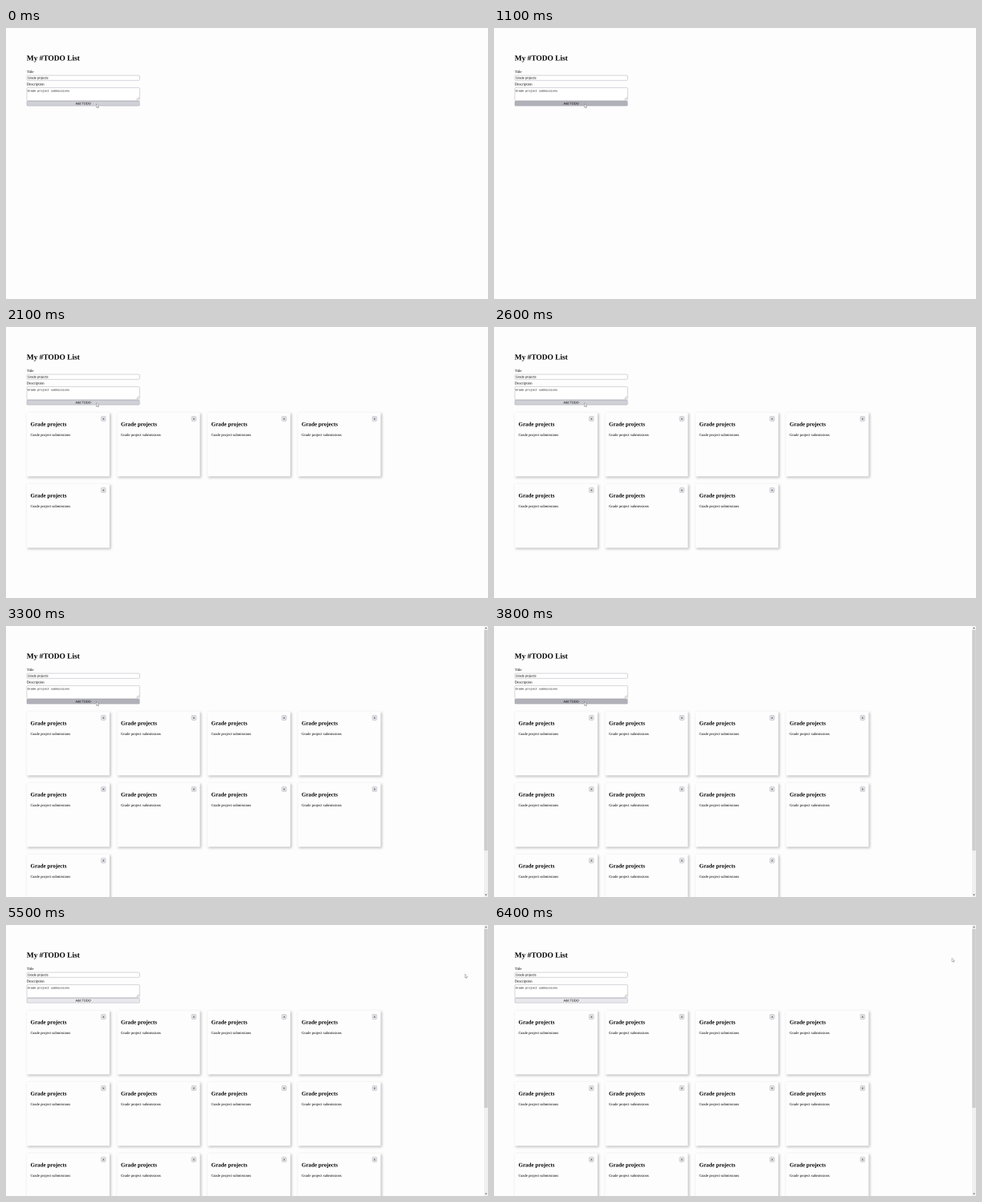
These frames come from a looping animation (600x338 px, 6600 ms). An HTML page with a canvas:

```html
<!DOCTYPE html>
<html lang="en">
<head>
<meta charset="utf-8">
<title>My #TODO List</title>
<style>
  html, body { margin: 0; width: 100%; height: 100%; overflow: hidden; background: #fdfdfd; }
  canvas { display: block; width: 600px; height: 338px; }
</style>
</head>
<body>
<canvas id="stage"></canvas>
<script>
const canvas = document.getElementById('stage');
const ctx = canvas.getContext('2d');
const W = 600, H = 338, LOOP = 6600, FRAME = 100;
const PAGE = W / 2048;                            // the page is laid out 2048 px wide
const RES = 2 * (window.devicePixelRatio || 1);   // oversampled for soft small text
canvas.width = W * RES;
canvas.height = H * RES;

const SERIF = '"Liberation Serif", "Times New Roman", serif';
const SANS = '"Liberation Sans", Arial, sans-serif';
const MONO = '"Liberation Mono", monospace';
const BG = '#fdfdfd', BORDER = '#8f8f9d';
const LEFT = 88, FORM_W = 480;
const CARD = { w: 352, h: 272, top: 364, gap: 32, cols: 4 };
const CLICKS = 13, HOLD = 100, LEAVE = 4800;

// Steady clicking, a little ahead of the beat halfway through
const clickTime = n => 1124 + 249 * n - 73 * Math.sin(Math.PI * n / (CLICKS - 1)) ** 2;

function clicksBy(t) {
  let n = 0;
  while (n < CLICKS && clickTime(n) <= t) n++;
  return n;
}

// Pointer legs: a wide sweep, a hook at the right edge, a slow drift
const rest = [112.4, 94.7];
const legs = [
  { from: LEAVE, to: 5400, path: [[145.8, 102.3], [355, 284], [563.4, 70]] },
  { from: 5400, to: 5900, path: [[563.4, 70], [587, 46], [569.6, 43]] },
  { from: 5900, to: 6400, path: [[569.6, 43], [569.2, 42.2], [570, 41.2]] }
];

function pointerAt(t) {
  const leg = legs.filter(l => t >= l.from).pop();
  if (!leg) return rest;
  const u = Math.min(1, (t - leg.from) / (leg.to - leg.from)), v = 1 - u;
  const [a, b, c] = leg.path;
  return [0, 1].map(i => v * v * a[i] + 2 * u * v * b[i] + u * u * c[i]);
}

function text(str, x, y, font, align = 'left') {
  ctx.font = font;
  ctx.textAlign = align;
  ctx.fillStyle = '#000';
  ctx.fillText(str, x, y);
}

function box(x, y, w, h, fill, radius = 3) {
  ctx.beginPath();
  ctx.roundRect(x + .6, y + .6, w - 1.2, h - 1.2, radius);
  ctx.fillStyle = fill;
  ctx.fill();
  ctx.strokeStyle = BORDER;
  ctx.lineWidth = 1.2;
  ctx.stroke();
}

function shape(points, fill) {
  ctx.beginPath();
  points.forEach(([x, y]) => ctx.lineTo(x, y));
  ctx.closePath();
  ctx.fillStyle = fill;
  ctx.fill();
}

function drawForm(buttonColor) {
  text('My #TODO List', LEFT, 138.5, `bold 32px ${SERIF}`);
  text('Title', LEFT, 191, `16px ${SERIF}`);
  box(LEFT, 201, FORM_W, 22, '#fff');
  text('Grade projects', LEFT + 4, 217, `13.33px ${SANS}`);
  text('Description', LEFT, 244.5, `16px ${SERIF}`);

  box(LEFT, 254, FORM_W, 55, '#fff', 2);
  text('Grade project submissions', LEFT + 3, 271, `11.9px ${MONO}`);
  ctx.strokeStyle = '#777';
  ctx.beginPath();
  for (let d = 4; d <= 12; d += 4) {
    ctx.moveTo(565 - d, 306);
    ctx.lineTo(565, 306 - d);
  }
  ctx.stroke();

  box(LEFT, 311, FORM_W, 21, buttonColor);
  text('Add TODO', LEFT + FORM_W / 2, 326, `13.33px ${SANS}`, 'center');
}

function drawCard(i) {
  const x = LEFT + (i % CARD.cols) * (CARD.w + CARD.gap);
  const y = CARD.top + Math.floor(i / CARD.cols) * (CARD.h + CARD.gap);
  const k = PAGE * RES;
  ctx.save();
  ctx.shadowColor = '#c0c0c0';
  ctx.shadowBlur = 10 * k;
  ctx.shadowOffsetX = ctx.shadowOffsetY = 5 * k;
  ctx.fillStyle = BG;
  ctx.fillRect(x, y, CARD.w, CARD.h);
  ctx.restore();

  box(x + 316, y + 16, 20, 21, '#e9e9ed');
  text('X', x + 326, y + 31.5, `13.33px ${SANS}`, 'center');
  text('Grade projects', x + 16, y + 57, `bold 24px ${SERIF}`);
  text('Grade project submissions', x + 16, y + 99.5, `16px ${SERIF}`);
}

function drawScrollbar(count) {
  const x = 2031, end = count > 12 ? 778 : 956;
  ctx.fillStyle = '#f0f0f0';
  ctx.fillRect(x, 0, 17, H / PAGE);
  ctx.fillStyle = '#cdcdcd';
  ctx.fillRect(x + 1, 17, 15, end - 17);
  const arrow = (base, tip) => shape([[x + 4, base], [x + 8.5, tip], [x + 13, base]], '#606060');
  arrow(11, 5);
  arrow(1142, 1148);
}

function drawPointer([x, y]) {
  ctx.save();
  ctx.translate(x, y);
  ctx.scale(PAGE, PAGE);
  shape([[0, 0], [0, 16], [4, 12.5], [7, 18], [9.5, 17], [6.8, 11.7], [11.5, 11.5]], '#fff');
  ctx.strokeStyle = '#333';
  ctx.lineWidth = 1;
  ctx.stroke();
  ctx.restore();
}

function draw(time) {
  const t = Math.floor(time / FRAME) * FRAME;   // the screen refreshes ten times a second
  const count = clicksBy(t);
  const down = clicksBy(t + HOLD) > count;
  const color = t >= LEAVE ? '#e9e9ed' : down ? '#b1b1b9' : '#d0d0d7';

  ctx.setTransform(RES, 0, 0, RES, 0, 0);
  ctx.textRendering = 'geometricPrecision';
  ctx.fillStyle = BG;
  ctx.fillRect(0, 0, W, H);
  ctx.save();
  ctx.scale(PAGE, PAGE);
  drawForm(color);
  for (let i = 0; i < count; i++) drawCard(i);
  if (count > 8) drawScrollbar(count);
  ctx.restore();
  drawPointer(pointerAt(t));
}

const start = performance.now();
function tick() {
  draw((performance.now() - start) % LOOP);
  requestAnimationFrame(tick);
}
tick();
</script>
</body>
</html>
```
